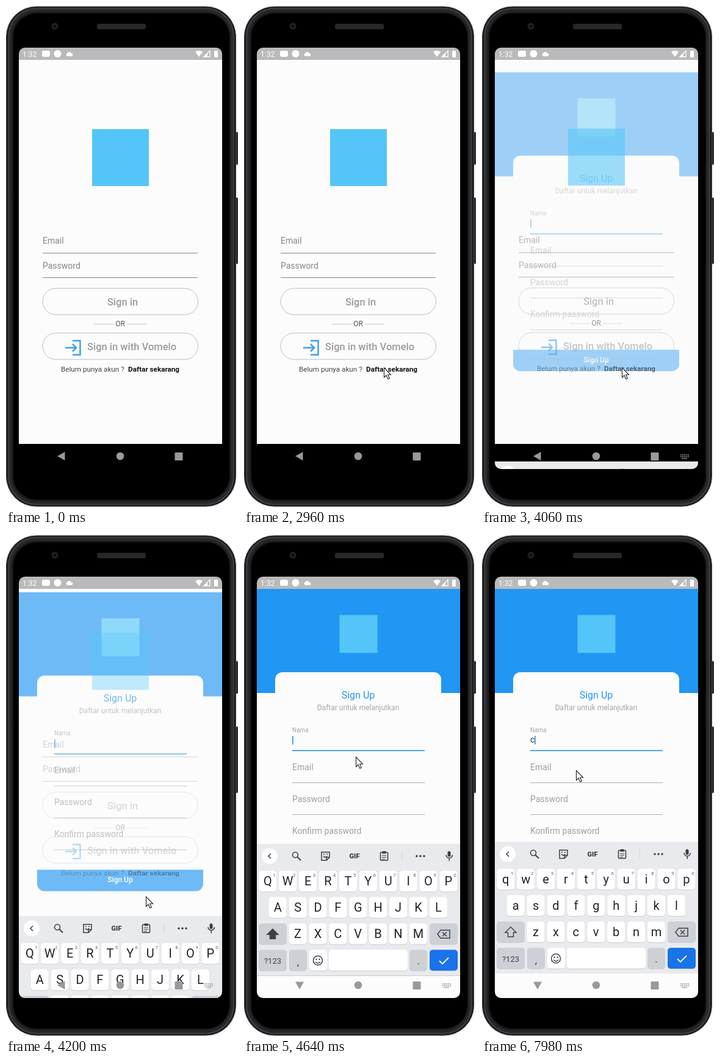
Recreate the animation shown at these times as an HTML page with a canvas. Size 380 by 818 pixels, loop 8000 ms.

```html
<!DOCTYPE html>
<html lang="id">
<head>
<meta charset="utf-8">
<style>
html, body { margin: 0; width: 100%; height: 100%; overflow: hidden; background: #fff; }
canvas { display: block; }
</style>
</head>
<body>
<canvas id="stage" width="380" height="818"></canvas>
<script>
const ctx = document.getElementById('stage').getContext('2d');
const LOOP = 8000;
const WHITE = '#fff', PAGE = '#fcfcfc', GREY = '#868686', PALE = '#a6a6a6', INK = '#3c4043';
const BLUE = '#2196f3', LOGO = '#54c5f8', NAV = '#99999c', KEYS = '#e8eaed', SPECIAL = '#cdd0d5';

const clamp = x => Math.min(1, Math.max(0, x));
const mix = (a, b, p) => a + (b - a) * p;

// Cubic bezier easing, solved by bisection.
function bezier(x1, y1, x2, y2) {
  const at = (a, b, s) => 3 * a * s * (1 - s) ** 2 + 3 * b * s * s * (1 - s) + s ** 3;
  return x => {
    let lo = 0, hi = 1;
    for (let i = 0; i < 20; i++) {
      const mid = (lo + hi) / 2;
      if (at(x1, x2, mid) < x) lo = mid; else hi = mid;
    }
    return at(y1, y2, lo);
  };
}
const slideEase = bezier(.4, 0, .2, 1), fadeEase = bezier(.42, 0, 1, 1);

function box(x, y, w, h, r, fill, stroke, line = 1) {
  ctx.beginPath();
  ctx.roundRect(x, y, w, h, r);
  paint(fill, stroke, line);
}
function dot(x, y, r, fill, stroke, line = 1) {
  ctx.beginPath();
  ctx.arc(x, y, r, 0, 7);
  paint(fill, stroke, line);
}
function shape(d, fill, stroke, line = 1, x = 0, y = 0) {
  const path = new Path2D();
  path.addPath(new Path2D(d), new DOMMatrix([1, 0, 0, 1, x, y]));
  paint(fill, stroke, line, path);
}
function paint(fill, stroke, line, path) {
  if (fill) { ctx.fillStyle = fill; path ? ctx.fill(path) : ctx.fill(); }
  if (stroke) {
    ctx.strokeStyle = stroke;
    ctx.lineWidth = line;
    path ? ctx.stroke(path) : ctx.stroke();
  }
}
function text(str, x, y, size, color, align = 'left', weight = 400) {
  ctx.font = `${weight} ${size}px Roboto, sans-serif`;
  ctx.textAlign = align;
  ctx.fillStyle = color;
  ctx.fillText(str, x, y);
}
function rule(x1, x2, y, color, h = 1) {
  ctx.fillStyle = color;
  ctx.fillRect(x1, y, x2 - x1, h);
}
function layer(draw, dy = 0) {
  ctx.save();
  ctx.translate(0, dy);
  draw();
  ctx.restore();
}

function drawPhone() {
  box(370, 206, 10, 53, 2, '#222225', '#606064');
  box(370, 313, 10, 108, 2, '#222225', '#606064');
  box(.5, 1, 376, 816, 49, '#1a1a1d', '#4c4c50');
  box(4.5, 4.5, 368, 809, 45, null, '#434347', 2);
  box(7.5, 8, 362, 802, 42, null, '#29292d', 3);
  box(12, 12, 354, 794, 38, '#000');
  dot(80, 33, 5.5, '#202023');
  dot(80, 33, 2, '#08080a');
  box(149, 29, 80, 9, 3, '#28282b');
}

function drawStatus() {
  rule(21, 354, 68, '#bababc', 20);
  text('1:32', 27, 83, 12, WHITE);
  box(59, 73, 13, 10, 3, WHITE);
  dot(84.5, 78, 6, WHITE);
  shape('M100 82a3 3 0 0 1 0-5a4 4 0 0 1 7 0a2.5 2.5 0 0 1 0 5z', WHITE);
  shape('M310 75q6-4 12 0l-6 8z', WHITE);
  shape('M324 83L334 73V83z', null, WHITE, 1.3);
  shape('M324 83L330 77V83z', WHITE);
  box(341, 73, 6, 11, 1, WHITE);
}

function drawLogin() {
  box(141, 201, 93, 93, 0, LOGO);
  text('Email', 60, 388, 14, GREY);
  text('Password', 60, 428.5, 14, GREY);
  rule(60, 314, 403, '#8a8a8a');
  rule(60, 314, 443, '#8a8a8a');
  box(60, 461, 254.5, 43, 21.5, null, '#bcbcbc');
  box(60, 534, 254.5, 43, 21.5, null, '#bcbcbc');
  text('Sign in', 191, 489, 16.5, '#9b9b9b', 'center', 500);
  rule(144, 176, 519, '#c6c6c6');
  rule(198, 230, 519, '#c6c6c6');
  text('OR', 187, 523, 12, '#555', 'center');
  shape('M97 558H115M109 552L115 558L109 564M109 546.5H121.5V569.5H109', null, '#3f9eea', 2.5);
  text('Sign in with Vomelo', 133, 562, 16.5, '#9b9b9b', 'left', 500);
  text('Belum punya akun ?', 90, 597, 11.7, '#444');
  text('Daftar sekarang', 284, 597, 11.7, '#111', 'right', 700);
}

function drawSignUp(caret, typed) {
  rule(21, 354, 88, BLUE, 170);
  box(156.5, 130.5, 62, 62, 0, LOGO);
  box(51, 224, 272, 352, 12, PAGE);
  text('Sign Up', 187, 267, 16, BLUE, 'center');
  text('Daftar untuk melanjutkan', 187, 286, 12, PALE, 'center');
  text('Nama', 79, 322, 10, PALE);
  rule(79, 296, 351, '#4ba8ee', 2);
  ['Email', 'Password', 'Konfirm password'].forEach((label, i) => {
    text(label, 79, 384 + i * 52, 14, '#9e9e9e');
    rule(79, 296, 404 + i * 52, '#b2b2b2');
  });
  box(51, 541, 272, 35, [0, 0, 12, 12], BLUE);
  text('Sign Up', 187, 562, 12, WHITE, 'center', 500);
  text(typed, 79, 339, 14, INK);
  ctx.globalAlpha = caret;
  rule(typed ? 86 : 79, typed ? 88 : 81, 328, '#4ba8ee', 14);
}

function drawToolbar() {
  dot(42, 521, 13, WHITE);
  shape('M44 517L40 521L44 525', null, INK, 1.6);
  dot(84, 519, 4.5, null, INK, 1.6);
  shape('M87.5 522.5L93 528', null, INK, 2);
  shape('M127 514.5H140V523L135 528H127zM140 523H135V528M130 521q3 4 6 0', null, INK, 1.5);
  dot(131, 518, 1, INK);
  dot(136, 518, 1, INK);
  text('GIF', 181, 525, 11, INK, 'center', 900);
  box(223.5, 515, 12, 13, 1, null, INK, 1.6);
  box(226.5, 513, 6, 4, 1, INK);
  shape('M226 520H233M226 523H233M226 526H231', null, INK);
  rule(258, 259, 514, '#d5d7da', 14);
  for (const x of [283, 289, 295]) dot(x, 521, 1.7, INK);
  box(333.5, 513, 5, 9, 2.5, INK);
  shape('M331 519a5.2 5.2 0 0 0 10.4 0M336.2 524V529', null, INK, 1.5);
}

function drawKeyboard(lower) {
  const key = (x, y, w, fill = WHITE) => {
    box(x, y + 1, w, 34, 5, '#cbcdd1');
    box(x, y, w, 34, 5, fill);
  };
  rule(21, 354, 501, KEYS, 215);
  rule(21, 354, 716, PAGE, 40);
  drawToolbar();
  [['QWERTYUIOP', 38.8], ['ASDFGHJKL', 55.2], ['ZXCVBNM', 88]].forEach(([letters, left], row) => {
    const y = 545 + row * 43;
    [...letters].forEach((letter, i) => {
      const x = left + i * 32.9;
      key(x - 14.5, y, 29);
      text(lower ? letter.toLowerCase() : letter, x, y + 24, 20, '#202124', 'center');
      if (!row) text((i + 1) % 10, x + 10.5, y + 10, 8, '#5f6368', 'center');
    });
  });
  key(24, 631, 46, SPECIAL);
  key(304, 631, 46, SPECIAL);
  shape('M47 640L56 649H51.5V656H42.5V649H38z', lower ? null : INK, INK, 1.4);
  shape('M322 642H337V655H322L317 648.5zM325 645L332 652M332 645L325 652', null, INK, 1.5);
  key(24, 674, 46, SPECIAL);
  text('?123', 47, 697, 13, INK, 'center');
  key(74, 674, 29, SPECIAL);
  text(',', 88.5, 700, 17, INK, 'center');
  key(107, 674, 29);
  dot(121, 691.5, 7.5, null, INK, 1.5);
  dot(118.5, 689.5, 1.2, INK);
  dot(123.5, 689.5, 1.2, INK);
  shape('M117 693.5q4 5 8 0', null, INK, 1.4);
  key(139, 674, 129);
  key(271, 674, 29, SPECIAL);
  text('.', 285.5, 698, 17, INK, 'center');
  key(304, 674, 46, '#1a73e8');
  shape('M320 692L325 697L335 687', null, WHITE, 1.8);
}

function drawNav(t) {
  ctx.save();
  ctx.translate(91, 735);
  ctx.rotate(-Math.PI / 2 * clamp((t - 4200) / 290));
  shape('M-7 0L5.5-7V7z', NAV);
  ctx.restore();
  dot(187, 735, 6.3, NAV);
  box(276.5, 729, 13, 13, 1, NAV);
  ctx.globalAlpha = .8 * clamp((t - 3960) / 100);
  for (let i = 0; i < 10; i++) rule(325 + i % 5 * 3, 327 + i % 5 * 3, 732 + (i > 4) * 3, NAV, 2);
  rule(327, 336, 738, NAV, 1.5);
  ctx.globalAlpha = 1;
}

// Pointer stops: time, x, y. Equal neighbours are rests.
const pointerStops = [
  [1140, 269, 523], [1500, 245, 548], [1940, 221, 575], [2200, 220, 570], [2640, 224, 589],
  [2920, 224, 589], [2960, 229, 590], [4240, 229, 590], [4340, 229, 587], [4460, 229, 587],
  [4640, 183, 362], [4740, 183, 362], [5060, 181, 342], [7119, 181, 342],
  [7120, 275, 362], [7139, 275, 362], [7140, 154, 384], [LOOP, 154, 384]
];
function drawPointer(t) {
  if (t < pointerStops[0][0]) return;
  const i = pointerStops.findIndex(stop => stop[0] > t);
  const [t0, x0, y0] = pointerStops[i - 1], [t1, x1, y1] = pointerStops[i];
  const p = (t - t0) / (t1 - t0);
  shape('M.5.5V16.5L4 13L6.7 19L9.3 18L6.7 12H11.5z', WHITE, '#222', 1.1, mix(x0, x1, p), mix(y0, y1, p));
}

function caretAlpha(t) {
  if (t < 5600) return 1;
  if (t < 5740) return 1 - (t - 5600) / 140;
  return t >= 6440 && t < 7840 || t >= 7980 ? 1 : 0;
}

function render(t) {
  // The device stalls briefly while the keyboard opens.
  const ui = t > 4360 && t < 4460 ? 4360 : t;
  const page = clamp((ui - 3570) / 820);
  const keyboardY = 255 * (1 - clamp((ui - 4050) / 890)) ** 4;
  const typed = t >= 7980 ? 'c' : '';

  ctx.clearRect(0, 0, 380, 818);
  drawPhone();
  ctx.save();
  ctx.beginPath();
  ctx.roundRect(21, 68, 333, 688, 10);
  ctx.clip();
  rule(21, 354, 68, '#000', 688);
  ctx.save();
  ctx.beginPath();
  ctx.rect(21, 88, 333, 627);
  ctx.clip();
  rule(21, 354, 88, PAGE, 627);
  if (page > 0) layer(() => drawSignUp(caretAlpha(t), typed), 162 * (1 - slideEase(page)));
  // The login page dissolves to reveal the form beneath.
  if (page < 1) {
    ctx.globalAlpha = 1 - fadeEase(page);
    rule(21, 354, 88, PAGE, 627);
    layer(drawLogin, -Math.max(0, 245 - keyboardY) / 3);
  }
  ctx.restore();
  if (keyboardY < 255) layer(() => drawKeyboard(typed), keyboardY);
  drawStatus();
  drawNav(t);
  ctx.restore();
  drawPointer(t);
}

function tick() {
  render(performance.now() % LOOP);
  requestAnimationFrame(tick);
}
tick();
</script>
</body>
</html>
```
